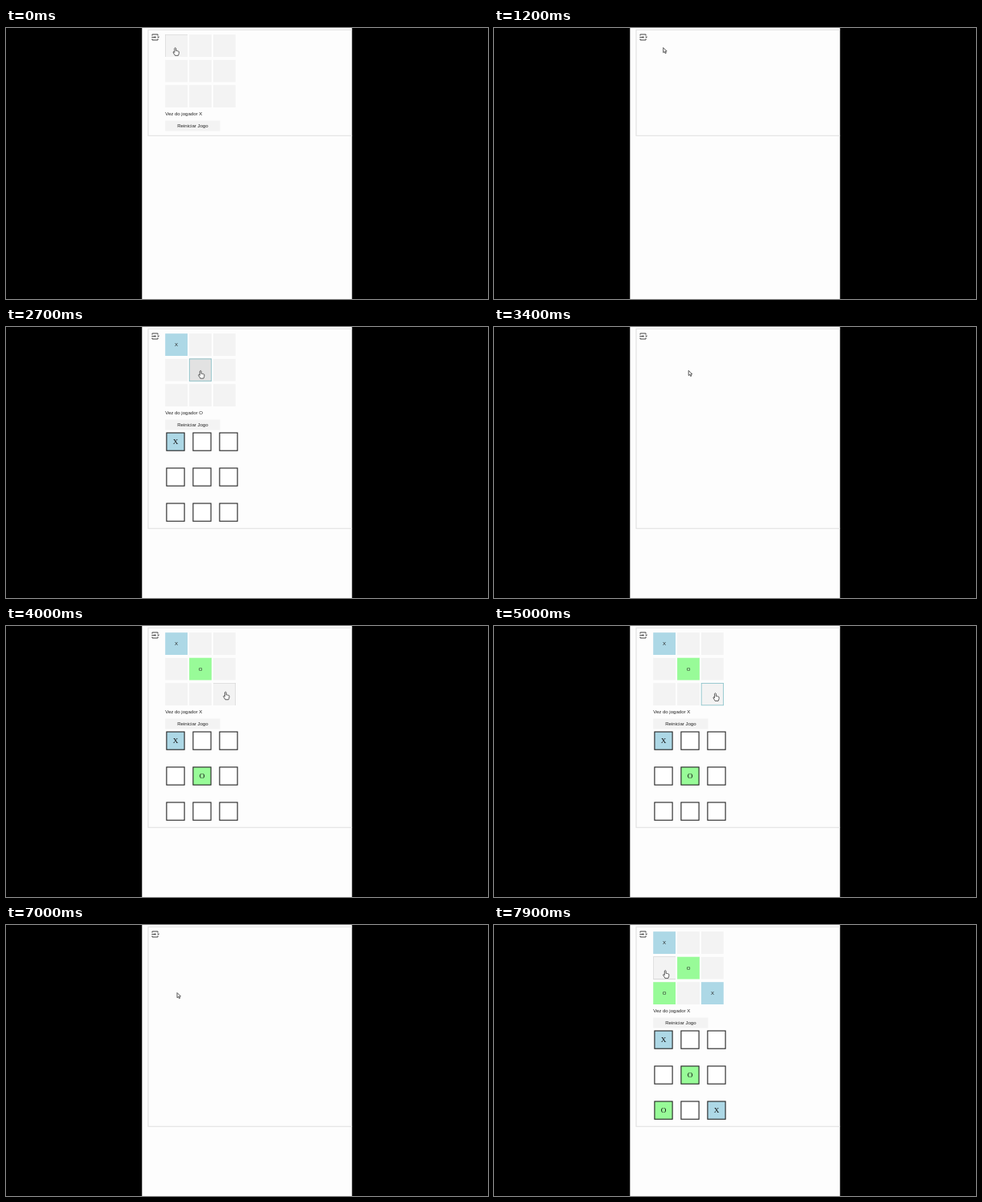
Recreate the animation shown at these times as an HTML page. Size 600 by 338 pixels, loop 8000 ms.

```html
<!DOCTYPE html>
<html lang="pt">
<head>
<meta charset="utf-8">
<style>
  html, body { margin: 0; width: 100%; height: 100%; overflow: hidden; background: #000; }
  svg { display: block; width: 100vw; height: 100vh; }
  text { font: 6.05px "Liberation Sans", Arial, sans-serif; fill: #222; }
  .mid { text-anchor: middle; }
  .plot text { font: 9.2px "Liberation Serif", "Times New Roman", serif; fill: #111; }
  .plot rect { stroke: #222; stroke-width: 1.1; }
  .hover { filter: drop-shadow(0 .9px .6px rgba(0, 0, 0, .5)); }
</style>
</head>
<body>
<svg viewBox="0 0 600 338">
  <rect width="600" height="338"/>
  <rect x="169.3" width="261.4" height="338" fill="#fdfdfd"/>
  <path id="panel" fill="none" stroke="#e0e0e0" stroke-width="1.1"/>
  <g fill="none" stroke="#444" stroke-width="1">
    <path d="M182 9.6V8h7v1.6M182 13.4V15h7v-1.6M181.3 11.5h5"/>
    <path d="M185 10l1.8 1.5-1.8 1.5zM188 10.8h3.2l-1.6 1.8z" fill="#444" stroke="none"/>
  </g>
  <g id="board">
    <g id="cells"></g>
    <text id="turn" x="198.2" y="109.2"></text>
    <rect x="198.2" y="115.5" width="68.3" height="13" fill="#f3f3f3"/>
    <text class="mid" x="232.4" y="124.2">Reiniciar Jogo</text>
  </g>
  <g id="plots" class="plot"></g>
  <g id="cursor" fill="#fff" stroke="#333" stroke-width=".8" stroke-linejoin="round">
    <path id="arrow" d="M0 0V6.2L1.5 4.9 2.5 7.2 3.6 6.7 2.6 4.5H4.5Z"/>
    <path id="hand" d="M-.9.8Q0-.6.9.8V4Q1.8 3.3 2.4 4.2 3.3 3.7 3.7 4.6 4.6 4.4 4.6 5.4V7Q4.4 8.4 3.7 9.8H-.3Q-1.2 8.2-2.4 6.4-2.9 5.1-1.8 5L-.9 6Z"/>
  </g>
</svg>
<script>
const LOOP = 8000, CELL = 27.8;
const NS = "http://www.w3.org/2000/svg";
const FILL = { X: "#add8e6", O: "#98fb98" };
const byId = id => document.getElementById(id);

// Each move: press, release, output cleared, buttons back, drawing back.
const moves = [
  { cell: 0, mark: "X", press: 500, release: 500, clear: 1200, board: 1300, plots: 1400 },
  { cell: 4, mark: "O", press: 2700, release: 2900, clear: 3400, board: 3500, plots: 3600 },
  { cell: 8, mark: "X", press: 4600, release: 5000, clear: 5300, board: 5400, plots: 5500 },
  { cell: 6, mark: "O", press: 6500, release: 6800, clear: 7000, board: 7400, plots: 7500 }
];

// Pointer stops: time, x, y
const stops = [
  [0, 210.7, 24.5], [1700, 219, 33], [1800, 226.7, 39.3],
  [2200, 240.5, 53], [2600, 242.2, 54.3],
  [3800, 251, 63], [3900, 264, 76], [4000, 273.3, 82], [4300, 275.5, 83.6],
  [5700, 263, 83], [5800, 244, 80.5], [5900, 228, 81.5], [6000, 216.2, 84.5],
  [6200, 214.8, 84.5], [6400, 213, 84.5],
  [7600, 213.5, 79], [7700, 214, 69], [7800, 214, 61], [7900, 213.2, 56.5]
];

function add(parent, tag, attrs) {
  const node = document.createElementNS(NS, tag);
  for (const key in attrs) node.setAttribute(key, attrs[key]);
  return parent.appendChild(node);
}

function makeGrid(parent, { x, y, dx, dy, size, baseline }) {
  return Array.from({ length: 9 }, (_, i) => {
    const left = x + i % 3 * dx, top = y + Math.floor(i / 3) * dy;
    return {
      left, top,
      rect: add(parent, "rect", { x: left, y: top, width: size, height: size }),
      label: add(parent, "text", { class: "mid", x: left + size / 2, y: top + baseline })
    };
  });
}

const cells = makeGrid(byId("cells"), { x: 198.2, y: 8.2, dx: 29.9, dy: 31.5, size: CELL, baseline: 15.8 });
const plots = makeGrid(byId("plots"), { x: 199.9, y: 132, dx: 33, dy: 44, size: 22.2, baseline: 14 });
const focusRing = add(byId("cells"), "rect", {
  width: CELL - .4, height: CELL - .4, fill: "none", stroke: "#8fc5cc", "stroke-width": .9
});

const show = (node, on) => node.setAttribute("visibility", on ? "inherit" : "hidden");

function paint(item, mark, empty) {
  item.rect.setAttribute("fill", FILL[mark] || empty);
  item.label.textContent = mark || "";
}

function render(t) {
  const active = moves.find(m => t >= m.press && t < m.clear);
  const blank = moves.some(m => t >= m.clear && t < m.board);
  const drawing = t >= moves[0].plots && !moves.some(m => t >= m.clear && t < m.plots);
  const done = moves.filter(m => t >= m.board);
  const [, x, y] = stops.filter(s => t >= s[0]).pop();
  const marks = {};
  done.forEach(m => marks[m.cell] = m.mark);

  const inside = c => x >= c.left && x <= c.left + CELL && y >= c.top && y <= c.top + CELL;
  const hovered = blank ? -1 : cells.findIndex(inside);
  const pressed = active && t < active.release;

  cells.forEach((c, i) => {
    const held = pressed && active.cell === i;
    const lifted = i === hovered && (!active || held);
    paint(c, marks[i], held ? "#e2e2e2" : "#f3f3f3");
    c.rect.setAttribute("class", lifted ? "hover" : "");
  });
  plots.forEach((p, i) => paint(p, marks[i], "#fff"));

  show(focusRing, active);
  if (active) {
    focusRing.setAttribute("x", cells[active.cell].left + .2);
    focusRing.setAttribute("y", cells[active.cell].top + .2);
  }
  show(byId("board"), !blank);
  show(byId("plots"), drawing);
  byId("turn").textContent = "Vez do jogador " + (done.length % 2 ? "O" : "X");
  byId("panel").setAttribute("d", `M430.7 2.3H177V${t < moves[0].plots ? 134.3 : 251.3}H430.7`);

  byId("cursor").setAttribute("transform", `translate(${x} ${y})`);
  show(byId("hand"), hovered >= 0);
  show(byId("arrow"), hovered < 0);
}

const start = performance.now();
function tick() {
  render((performance.now() - start) % LOOP);
  requestAnimationFrame(tick);
}
tick();
</script>
</body>
</html>
```
